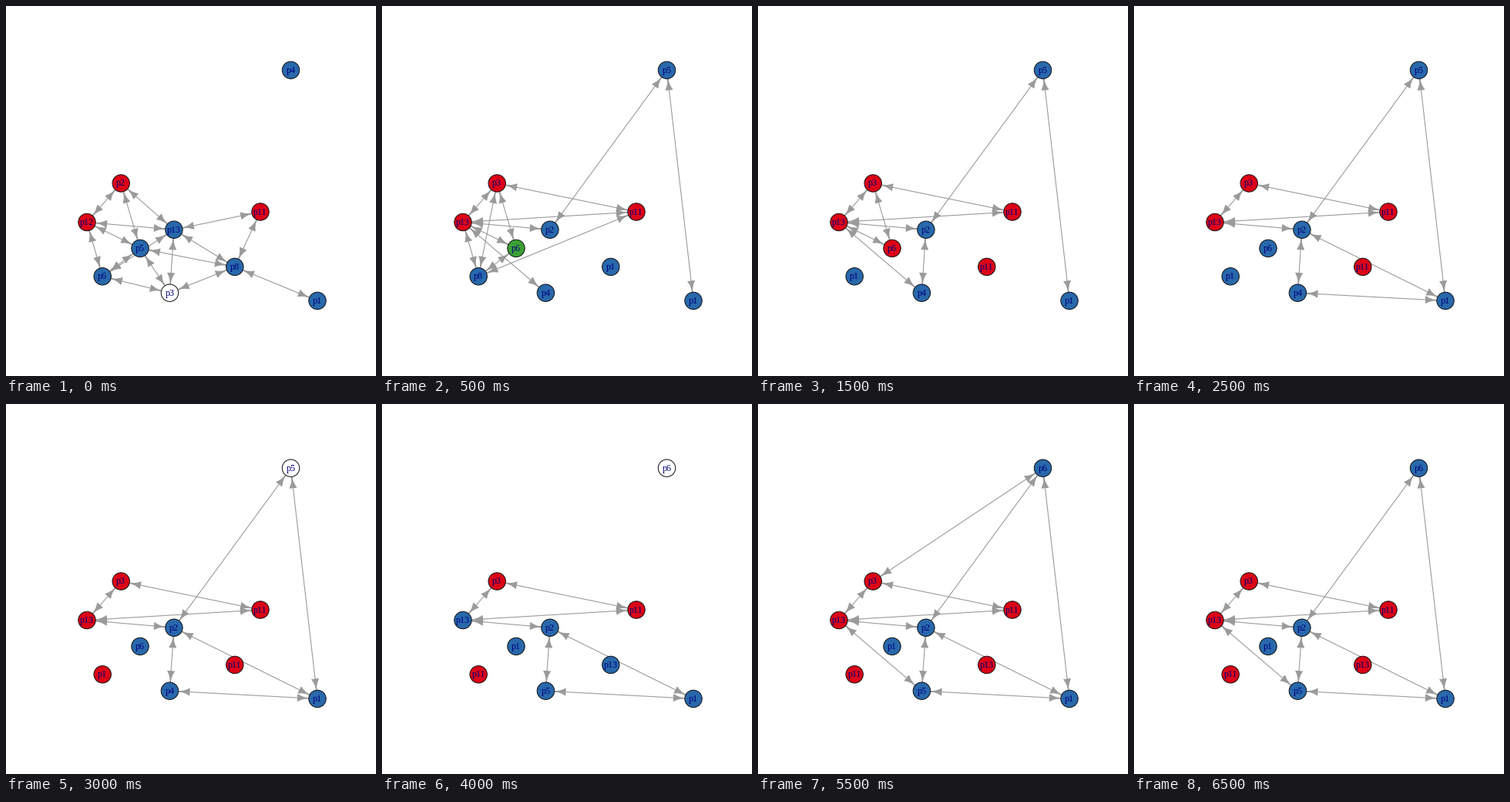
Recreate the animation shown at these times as a matplotlib script. Size 480x480 px, loop 7000 ms.

```python
import numpy as np
import matplotlib.pyplot as plt
from matplotlib.animation import FuncAnimation
from matplotlib.patches import Circle, Polygon

SIZE, DPI = 480, 80
PX = 72 / DPI              # one pixel in points
RADIUS = 11.2
HEAD = 14.4                # arrowhead length
GREY, INK = "#9a9a9a", "#00007f"
FILL = {"r": "#dc0416", "b": "#2868ab", "g": "#3ca034", "w": "#ffffff"}

POS = {
    "a": (149.2, 230.0), "b": (105.0, 280.5), "c": (217.9, 290.2),
    "d": (174.0, 314.4), "e": (125.2, 350.8), "f": (212.4, 372.2),
    "g": (296.8, 338.4), "h": (330.0, 267.0), "i": (404.0, 382.4),
    "j": (369.5, 83.2),
}

# Each step: new labels, new colours, links added, links dropped.
STEPS = [
    ("a2 b12 c13 d5 e6 f3 g8 h11 i1 j4", "ar br cb db eb fw gb hr ib jb",
     "ab ac ad bc bd be ce cf cg ch de df dg ef fg gh gi", ""),
    ("a3 b13 c2 d6 e8 f4 g1 j5", "dg fb",
     "ae ah bf bh eh cj ij", "ac ce cf cg ch df dg ef fg gh gi"),
    ("", "dr", "cf ei", ""),
    ("e1 g11", "gr", "", "ae be de eh ei"),
    ("", "db", "", "ad bd bf"),
    ("", "", "ci fi", ""),
    ("", "jw er", "", ""),
    ("d1 e11 f5 g13 j6", "", "", "cj ij"),
    ("", "bb gb", "", ""),
    ("", "br gr jb ab", "aj bf", ""),
    ("", "ar", "", ""),
    ("", "", "cj ij", ""),
    ("", "jw", "", "aj"),
    ("", "jb", "", ""),
]


def state_at(step):
    labels, colours, links = {}, {}, set()
    for names, fills, added, dropped in STEPS[:step + 1]:
        labels.update((s[0], "p" + s[1:]) for s in names.split())
        colours.update((s[0], s[1]) for s in fills.split())
        links |= set(added.split())
        links -= set(dropped.split())
    return labels, colours, sorted(links)


def arrowhead(ax, tip, way):
    back = np.sqrt(np.linspace(0, HEAD ** 2, 9))
    half = 0.3 * back ** 2 / HEAD + 0.07
    along = np.r_[back, back[::-1]]
    across = np.r_[half, -half[::-1]]
    normal = np.array([-way[1], way[0]])
    points = tip - np.outer(along, way) + np.outer(across, normal)
    ax.add_patch(Polygon(points, fc=GREY, ec=GREY, lw=PX,
                         joinstyle="round", zorder=1))


def draw_link(ax, link):
    p, q = (np.array(POS[k]) for k in link)
    way = (q - p) / np.hypot(*(q - p))
    start, end = p + RADIUS * way, q - RADIUS * way
    ax.plot(*zip(start, end), color=GREY, lw=1.1 * PX, zorder=1)
    arrowhead(ax, end, way)
    arrowhead(ax, start, -way)


def draw_node(ax, key, label, colour):
    x, y = POS[key]
    ax.add_patch(Circle((x, y), RADIUS, fc=FILL[colour], ec="#111111",
                        lw=PX, zorder=2))
    ax.text(x, y + 3.5, label, family="Liberation Serif", size=12 * PX,
            color=INK, ha="center", va="baseline", zorder=3)


fig = plt.figure(figsize=(SIZE / DPI, SIZE / DPI), dpi=DPI, facecolor="white")
ax = fig.add_axes([0, 0, 1, 1])


def draw(step):
    ax.clear()
    ax.set(xlim=(0, SIZE), ylim=(SIZE, 0))
    ax.axis("off")
    labels, colours, links = state_at(step)
    for link in links:
        draw_link(ax, link)
    for key in POS:
        draw_node(ax, key, labels[key], colours[key])
    return []


anim = FuncAnimation(fig, draw, frames=len(STEPS), init_func=lambda: [],
                     interval=500, repeat=True, repeat_delay=0)
plt.show()
```
